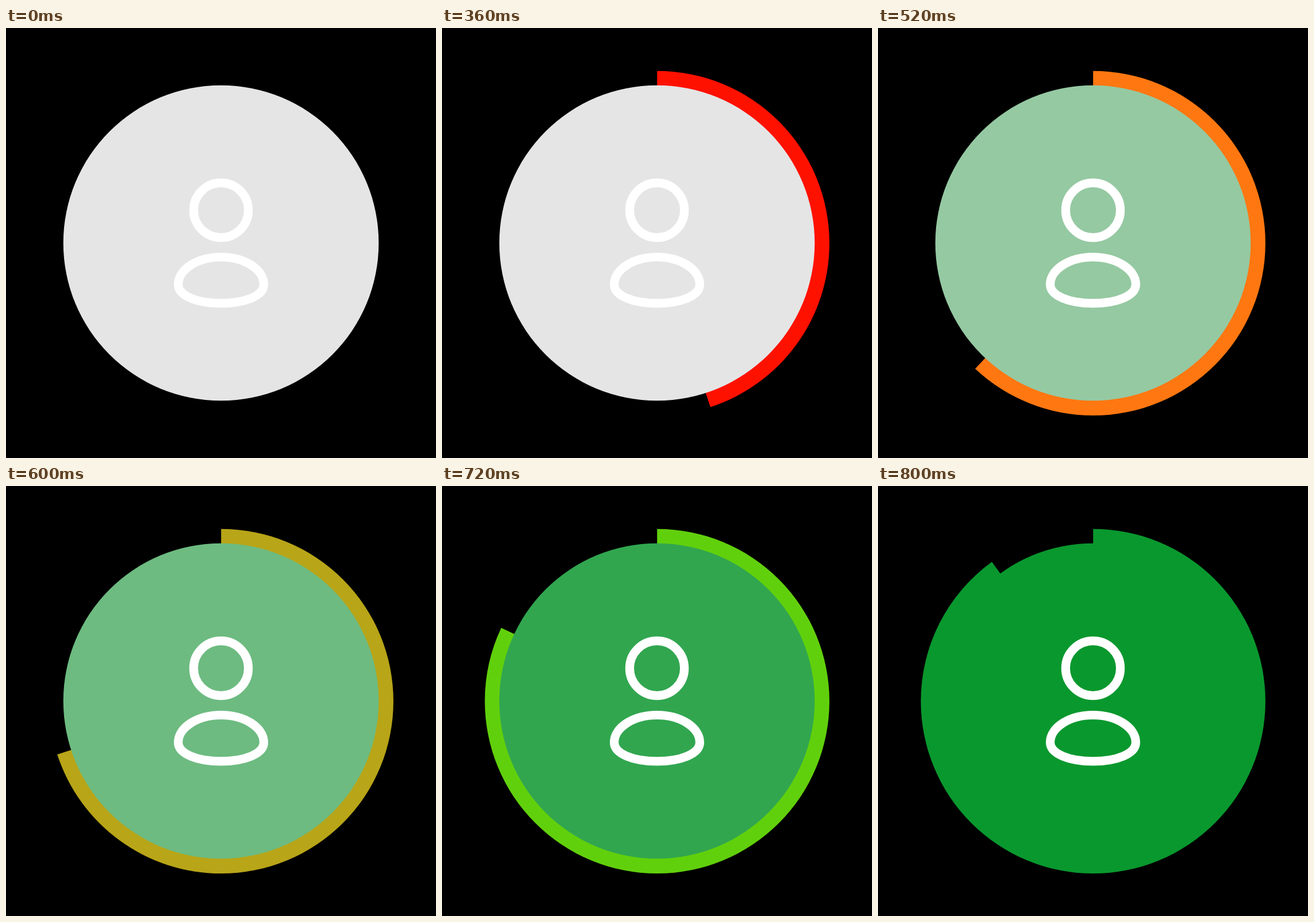
An HTML page with a canvas for the animation above (1.2 s loop, 748 by 748 pixels).

```html
<!DOCTYPE html>
<html lang="en">
<head>
<meta charset="utf-8">
<title>Profile progress</title>
<style>
html, body { margin: 0; width: 100%; height: 100%; overflow: hidden; background: #000; }
canvas { display: block; width: 100vw; height: 100vh; }
</style>
</head>
<body>
<canvas id="stage" width="748" height="748"></canvas>
<script>
const ctx = document.getElementById('stage').getContext('2d');
const LOOP = 1200, STEP = 20, MID = 374;

// Keys: [time in ms, ...values]
const SWEEP = [[0, 0], [400, 180], [800, 324]];
const DISC = [[360, 229, 229, 229], [800, 9, 152, 46]];
const RING = [
  [360, 255, 17, 0],
  [520, 255, 119, 17],
  [660, 130, 200, 30],
  [720, 97, 208, 12],
  [800, 9, 152, 46]
];

function sample(keys, t) {
  if (t <= keys[0][0]) return keys[0].slice(1);
  const i = keys.findIndex(k => k[0] >= t);
  if (i < 0) return keys[keys.length - 1].slice(1);
  const a = keys[i - 1], b = keys[i];
  const p = (t - a[0]) / (b[0] - a[0]);
  return a.slice(1).map((v, n) => v + (b[n + 1] - v) * p);
}

const rgb = c => `rgb(${c.map(Math.round).join(',')})`;

function drawRing(t) {
  const sweep = sample(SWEEP, t)[0];
  if (!sweep) return;
  const start = -Math.PI / 2;
  ctx.fillStyle = rgb(sample(RING, t));
  ctx.beginPath();
  ctx.moveTo(MID + 0.2, MID + 0.4);
  ctx.arc(MID + 0.2, MID + 0.4, 299.7, start, start + sweep * Math.PI / 180);
  ctx.fill();
}

function drawDisc(t) {
  ctx.fillStyle = rgb(sample(DISC, t));
  ctx.beginPath();
  ctx.arc(MID, MID, 274.3, 0, Math.PI * 2);
  ctx.fill();
}

function drawPerson() {
  ctx.strokeStyle = '#fff';
  ctx.lineWidth = 15.2;
  ctx.beginPath();
  ctx.arc(MID, 317, 47.6, 0, Math.PI * 2);
  ctx.stroke();

  ctx.beginPath();
  ctx.moveTo(299.6, 446);
  ctx.bezierCurveTo(299.6, 420, 333, 398.5, 374, 398.5);
  ctx.bezierCurveTo(415, 398.5, 448.4, 420, 448.4, 446);
  ctx.bezierCurveTo(448.4, 466, 415, 478.8, 374, 478.8);
  ctx.bezierCurveTo(333, 478.8, 299.6, 466, 299.6, 446);
  ctx.closePath();
  ctx.stroke();
}

function draw(t) {
  ctx.fillStyle = '#000';
  ctx.fillRect(0, 0, 748, 748);
  drawRing(t);
  drawDisc(t);
  drawPerson();
}

const origin = performance.now();
function tick() {
  const t = (performance.now() - origin) % LOOP;
  draw(Math.floor(t / STEP) * STEP);
  requestAnimationFrame(tick);
}
tick();
</script>
</body>
</html>
```
